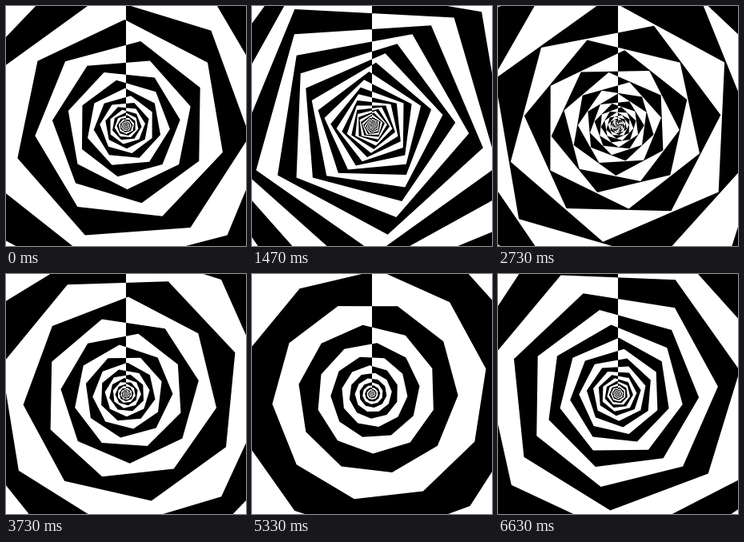
Write an HTML page with a canvas that moves like this. It is 300x300 px and loops after 6.66 s.

```html
<!DOCTYPE html>
<html lang="en">
<head>
<meta charset="utf-8">
<title>Spiral</title>
<style>
  html, body { margin: 0; width: 100%; height: 100%; overflow: hidden; background: #fff; }
  canvas { display: block; width: 300px; height: 300px; }
</style>
</head>
<body>
<canvas id="stage"></canvas>
<script>
  const SIZE = 300, LOOP = 6660, STEPS = 200;
  const RADIUS = 375, SHRINK = 0.97, POINTS = 260;
  const TAU = Math.PI * 2;

  const canvas = document.getElementById('stage');
  const ratio = window.devicePixelRatio || 1;
  canvas.width = canvas.height = Math.round(SIZE * ratio);
  const ctx = canvas.getContext('2d');
  ctx.scale(ratio, ratio);

  // Turn between neighbouring vertices, swinging around 54 degrees.
  function turnAt(step) {
    const degrees = 54 + 17.2 * Math.sin(TAU * (step - 2) / STEPS);
    return degrees * Math.PI / 180;
  }

  // The even-odd fill makes the bands; closing the path makes the upright seam.
  function draw(step) {
    const turn = turnAt(step), mid = SIZE / 2;
    ctx.fillStyle = '#fff';
    ctx.fillRect(0, 0, SIZE, SIZE);
    ctx.beginPath();
    for (let i = 0; i < POINTS; i++) {
      const r = RADIUS * SHRINK ** i, a = i * turn;
      ctx.lineTo(mid + r * Math.sin(a), mid - r * Math.cos(a));
    }
    ctx.lineTo(mid, mid);
    ctx.closePath();
    ctx.fillStyle = '#000';
    ctx.fill('evenodd');
  }

  const start = performance.now();
  function tick() {
    const time = (performance.now() - start) % LOOP;
    draw(Math.floor((time + 5) * STEPS / LOOP) % STEPS);
    requestAnimationFrame(tick);
  }
  tick();
</script>
</body>
</html>
```
